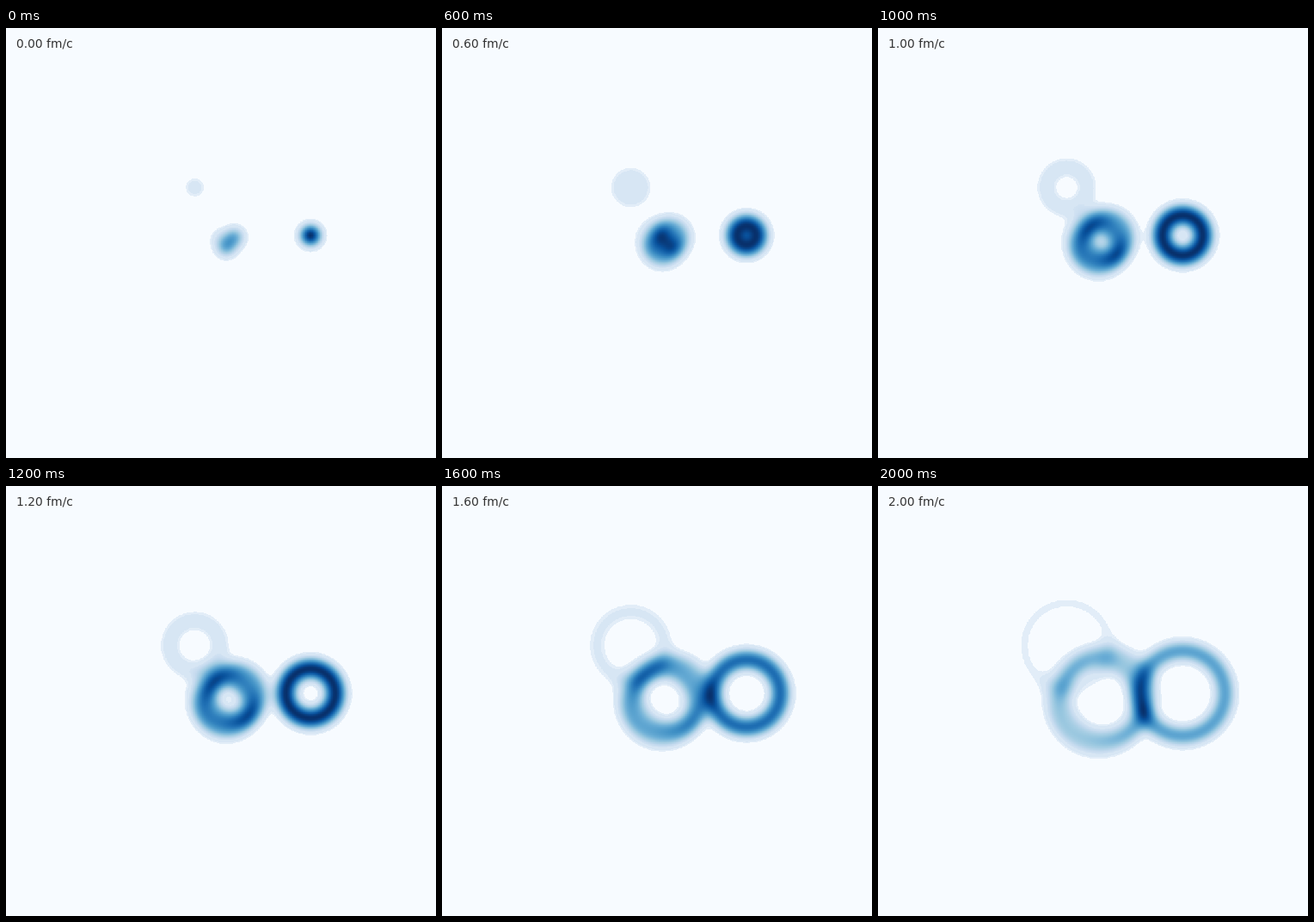
A matplotlib script for the animation above (2100 ms loop, 500 by 500 pixels).

```python
import matplotlib.pyplot as plt
import numpy as np
from matplotlib.animation import FuncAnimation
from matplotlib.colors import ListedColormap

SIZE = 500     # stage, px
CELLS = 200    # grid cells per side
SCALE = 25     # px per fm, streaming at light speed
SIGMA = 8.75   # width of each hot spot, px
FRAMES = 21

# x, y, weight
SPOTS = [
    (354.2, 241.2, 1.0),
    (266, 243, 0.43),
    (256, 255, 0.43),
    (248, 244, 0.12),
    (219.5, 185.5, 0.17),
]

axis = (np.arange(CELLS) + 0.5) * SIZE / CELLS
X, Y = np.meshgrid(axis, axis)


def streamed(x, y, weight, dist):
    """Gaussian spot averaged over all directions after streaming dist px."""
    r = np.hypot(X - x, Y - y)
    fall = np.exp(-(r**2 + dist**2) / (2 * SIGMA**2))
    return weight * fall * np.i0(r * dist / SIGMA**2)


def density(t):
    field = sum(streamed(*spot, SCALE * t) for spot in SPOTS)
    return field / field.max()


def stepped_blues():
    """Blues with a few flat tones at the faint end."""
    v = np.linspace(0, 1, 512)
    tone = np.select([v < 0.083, v < 0.115, v < 0.19], [0, 0.105, 0.16], v)
    return ListedColormap(plt.get_cmap("Blues")(tone))


fig = plt.figure(figsize=(5, 5), dpi=100)
ax = fig.add_axes([0, 0, 1, 1])
ax.axis("off")
image = ax.imshow(density(0), cmap=stepped_blues(), vmin=0, vmax=1,
                  interpolation="hanning", extent=(0, SIZE, SIZE, 0))
label = ax.text(12, 23, "", color="#333333", fontsize=10,
                family="DejaVu Sans", va="baseline")


def update(i):
    t = i / 10
    image.set_data(density(t))
    label.set_text(f"{t:.2f} fm/c")
    return image, label


anim = FuncAnimation(fig, update, frames=FRAMES, interval=100,
                     repeat=True, repeat_delay=0)
plt.show()
```
